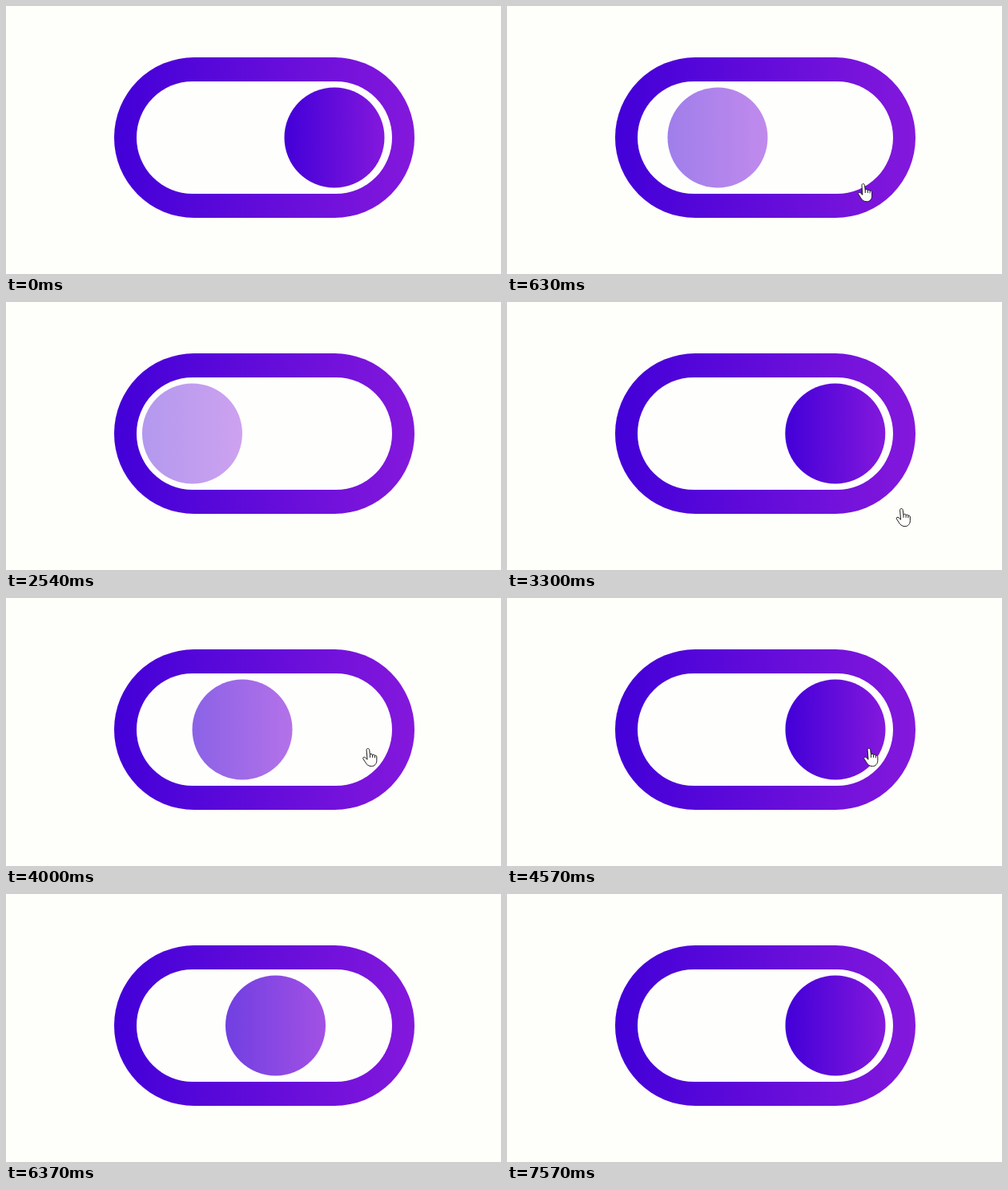
These frames come from a looping animation (618 px wide and 334 px high, 7.6 s). An HTML page:

```html
<!DOCTYPE html>
<html lang="en">
<head>
<meta charset="utf-8">
<title>Toggle switch</title>
<style>
  html, body { margin: 0; width: 100%; height: 100%; overflow: hidden; background: #fefefb; }
  svg { display: block; }
</style>
</head>
<body>
<svg width="618" height="334" viewBox="0 0 618 334">
  <defs>
    <linearGradient id="violet">
      <stop offset="0" stop-color="#4200d8"/>
      <stop offset="1" stop-color="#8418dc"/>
    </linearGradient>
  </defs>
  <rect x="135" y="64" width="375" height="200" rx="100" fill="url(#violet)"/>
  <rect x="163" y="94" width="319" height="140" rx="70" fill="#fefefd"/>
  <circle id="knob" cy="164" r="62.5" fill="url(#violet)"/>
  <path id="hand" fill="#fefefb" stroke="#111" stroke-width="1" stroke-linejoin="round"
    d="M-2 2C-2-.6 1.6-.6 1.8 2L2.6 8.5C3 6.6 5.6 6.8 5.9 8.8C6.6 7.4 8.6 7.9 8.8 9.6C9.8 8.6 11.4 9.2 11.4 11
       V16C11.4 20 8.6 23.4 4.6 23.4C.6 23.4-2 21-3.6 18L-6.4 13.6C-7.4 11.6-5 10.6-3.6 12L-1 14.5Z
       M2.6 8.5V12M5.9 8.8V12M8.8 9.6V12.4"/>
</svg>
<script>
const LOOP = 7600, SLIDE = 400, ON_X = 410, OFF_X = 232.5, OFF_OPACITY = .4;
const clicks = [420, 1130, 1830, 2700, 3300, 3911, 4876, 5480, 6270, 7080];

// Pointer visits: [time, x, y] of the fingertip
const visits = [
  [[350, 505, 246], [1050, 335, 177], [1700, 335, 177], [2250, 576, 150]],
  [[3250, 494, 260], [3700, 452, 187.5], [6000, 452, 187.5]]
];

const [knob, hand] = ["knob", "hand"].map(id => document.getElementById(id));
const mix = (a, b, p) => a + (b - a) * p;
const smooth = p => p * p * (3 - 2 * p);

// cubic-bezier(.25, .1, .25, 1)
function ease(x) {
  const bezier = (s, a, b) => 3 * a * s * (1 - s) ** 2 + 3 * b * s * s * (1 - s) + s ** 3;
  let lo = 0, hi = 1;
  for (let i = 0; i < 20; i++) {
    const mid = (lo + hi) / 2;
    if (bezier(mid, .25, .25) < x) lo = mid; else hi = mid;
  }
  return bezier(lo, .1, 1);
}

function level(t) {
  const count = clicks.filter(c => c <= t).length;
  if (!count) return 1;
  const p = ease(Math.min(1, (t - clicks[count - 1]) / SLIDE));
  return count % 2 ? 1 - p : p;
}

function pointer(t) {
  const visit = visits.find(v => t >= v[0][0] && t < v.at(-1)[0]);
  if (!visit) return null;
  const i = visit.findIndex(key => key[0] > t);
  const [t0, x0, y0] = visit[i - 1], [t1, x1, y1] = visit[i];
  const p = smooth((t - t0) / (t1 - t0));
  return [mix(x0, x1, p), mix(y0, y1, p)];
}

function draw() {
  const t = performance.now() % LOOP, on = level(t), tip = pointer(t);
  knob.setAttribute("cx", mix(OFF_X, ON_X, on));
  knob.setAttribute("opacity", mix(OFF_OPACITY, 1, on));
  hand.setAttribute("visibility", tip ? "visible" : "hidden");
  if (tip) hand.setAttribute("transform", `translate(${tip}) scale(.95)`);
  requestAnimationFrame(draw);
}
draw();
</script>
</body>
</html>
```
